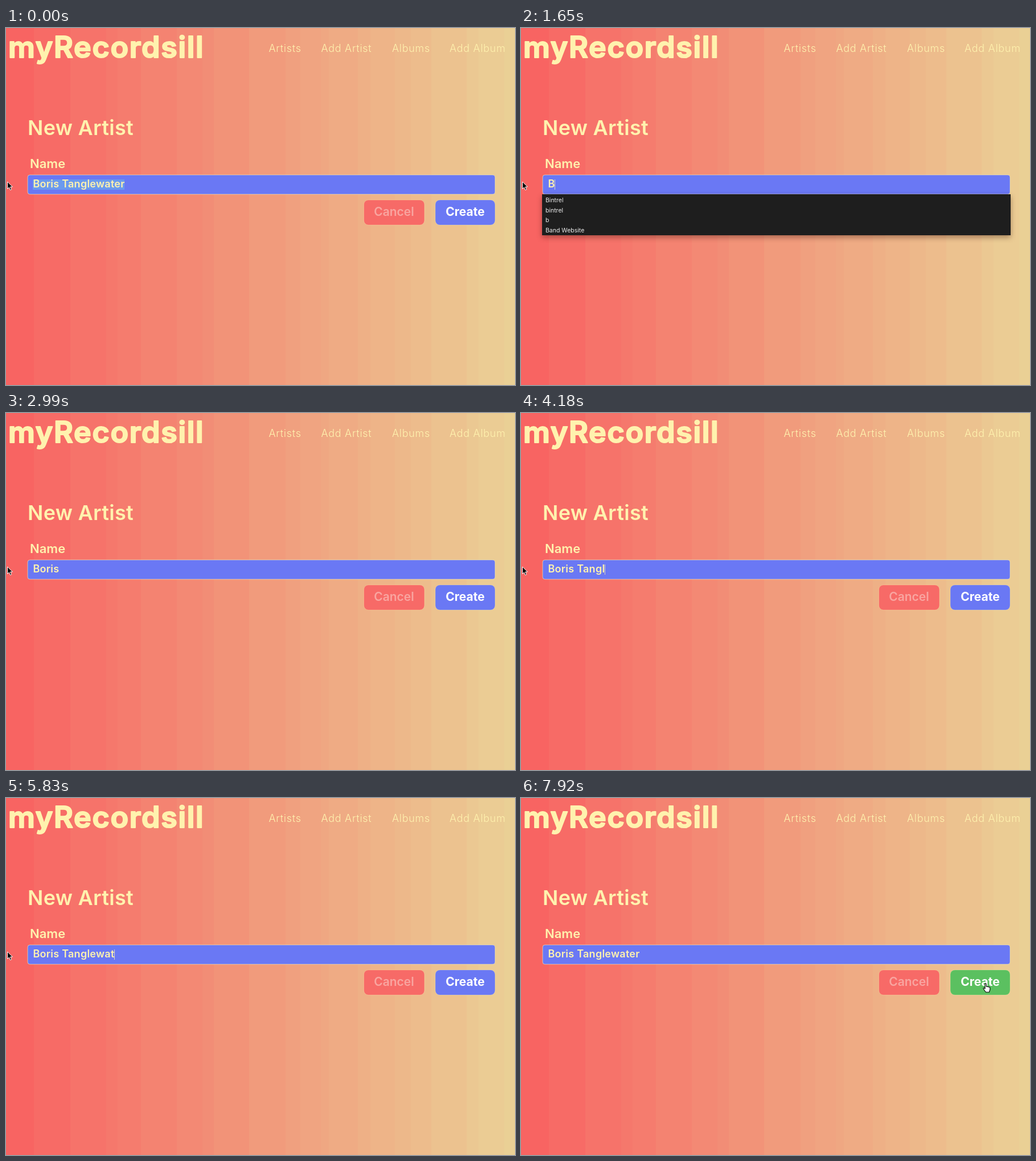
Write an HTML page that moves like this. It is 894x627 px and loops after 8000 ms.

```html
<!DOCTYPE html>
<html lang="en">
<head>
<meta charset="utf-8">
<title>New Artist</title>
<style>
html, body { margin: 0; width: 100%; height: 100%; overflow: hidden; background: #f09a7c; }
svg { display: block; }
text { font-family: Inter, "Open Sans", sans-serif; font-weight: 600; fill: #fff2ae; white-space: pre; }
.logo { font-size: 52px; letter-spacing: 1.7px; stroke: #fff2ae; stroke-width: 2.2px; stroke-linejoin: round; }
.nav text { font-size: 18px; font-weight: 300; letter-spacing: .7px; }
.title { font-size: 36px; letter-spacing: .3px; }
.label { font-size: 22px; }
#typed { font-size: 18px; letter-spacing: .25px; }
.button text { font-size: 21px; text-anchor: middle; }
.box { stroke: #fff2ae; stroke-opacity: .6; }
.button .box { stroke-opacity: .35; }
#list { filter: drop-shadow(0 4px 5px rgba(60, 20, 10, .4)); }
#list text { font-size: 10.5px; font-weight: 400; fill: #eee; }
</style>
</head>
<body>
<svg width="894" height="627" viewBox="0 0 894 627">
  <g id="bands" shape-rendering="crispEdges"></g>
  <text class="logo" x="4" y="52">myRecordsill</text>
  <g class="nav">
    <text x="461.5" y="42">Artists</text>
    <text x="553.5" y="42">Add Artist</text>
    <text x="678" y="42">Albums</text>
    <text x="779" y="42">Add Album</text>
  </g>
  <text class="title" x="38" y="188">New Artist</text>
  <text class="label" x="42" y="246">Name</text>

  <rect class="box" x="38" y="258" width="821" height="34" rx="4" fill="#6a78f4"/>
  <rect id="selection" x="47" y="266" height="18" fill="#6b9aee"/>
  <text id="typed" x="47.5" y="280"></text>
  <rect id="caret" y="266" width="1" height="18" fill="#fff2ae" opacity=".75"/>

  <g class="button">
    <rect class="box" x="628.5" y="302" width="106.5" height="44" rx="8" fill="#f76a67"/>
    <text x="681.5" y="330" style="fill:#f9a5a0">Cancel</text>
    <rect class="box" id="create" x="754" y="302" width="105" height="44" rx="8"/>
    <text x="806.5" y="330" style="fill:#fff;font-weight:700">Create</text>
  </g>

  <g id="list">
    <rect x="37" y="292" width="823" height="72" fill="#1e1e1e"/>
    <text x="43" y="306">Bintrel</text>
    <text x="43" y="323.5">bintrel</text>
    <text x="43" y="341">b</text>
    <text x="43" y="358.5">Band Website</text>
  </g>

  <path id="arrow" d="M0 0V12.5L2.9 9.9L5 14.6L7.2 13.6L5.1 9H9Z" fill="#000" stroke="#fff" stroke-width="1"/>
  <path id="hand" transform="translate(811 325)" fill="#fff" stroke="#000" stroke-width="1.1" stroke-linejoin="round"
    d="M4 10V1.8Q4 .5 5 .5T6.2 1.8V6.2Q7.2 5 8.4 6.6Q9.6 5.6 10.7 7.1Q12.8 6.6 12.8 8.8V11.5L11.4 16H5.4L1.2 10.2Q.8 8.4 2.4 8.6Z"/>
</svg>
<script>
const $ = id => document.getElementById(id);
const LOOP = 8000, NAME = "Boris Tanglewater";
const keyTimes = [1500, 1800, 1950, 2250, 2550, 2840, 3430, 3730, 3880,
  4030, 4180, 4630, 5080, 5530, 5830, 5980, 6280];
const caretOff = [[0, 300], [600, 1200], [2990, 3730], [6280, LOOP]];
const within = (t, [from, to]) => t >= from && t < to;
const show = (id, on) => $(id).setAttribute("visibility", on ? "visible" : "hidden");

// Background: a linear blend sampled once per stripe
const edges = [0, 49, 113, 176, 196, 237, 300, 345, 365, 427, 491, 517,
  553, 567, 618, 640, 683, 711, 747, 809, 830, 875, 894];
const left = [248, 97, 97], right = [234, 209, 150];
$("bands").innerHTML = edges.slice(0, -1).map((x, i) => {
  const end = edges[i + 1], mid = (x + end) / 2 / 894;
  const color = left.map((c, j) => Math.round(c + (right[j] - c) * mid));
  return `<rect x="${x}" width="${end - x}" height="627" fill="rgb(${color})"/>`;
}).join("");

function moveArrow(t) {
  const step = t < 6730 ? 0 : Math.min(8, 1 + Math.floor((t - 6730) * 7 / 1040 + 1e-6));
  const s = step / 8, u = s * s * (3 - 2 * s);
  const x = 2.5 + 811 * u, y = 270 + 56 * u + 128 * Math.sin(Math.PI * u);
  $("arrow").setAttribute("transform", `translate(${x} ${y})`);
}

function draw(now) {
  const t = now % LOOP, selected = t < 300, hover = t >= 7920;
  const count = selected ? NAME.length : keyTimes.filter(k => t >= k).length;
  const typed = $("typed");
  typed.textContent = NAME.slice(0, count);
  const width = count ? typed.getComputedTextLength() : 0;
  $("selection").setAttribute("width", width);
  $("caret").setAttribute("x", Math.round(47 + width));
  show("selection", selected);
  show("caret", !caretOff.some(span => within(t, span)));
  show("list", within(t, [1650, 1800]));
  show("arrow", !hover);
  show("hand", hover);
  $("create").setAttribute("fill", hover ? "#5bc060" : "#6a78f4");
  moveArrow(t);
}

let start;
function tick(now) {
  start ??= now;
  draw(now - start);
  requestAnimationFrame(tick);
}
draw(0);
requestAnimationFrame(tick);
</script>
</body>
</html>
```
